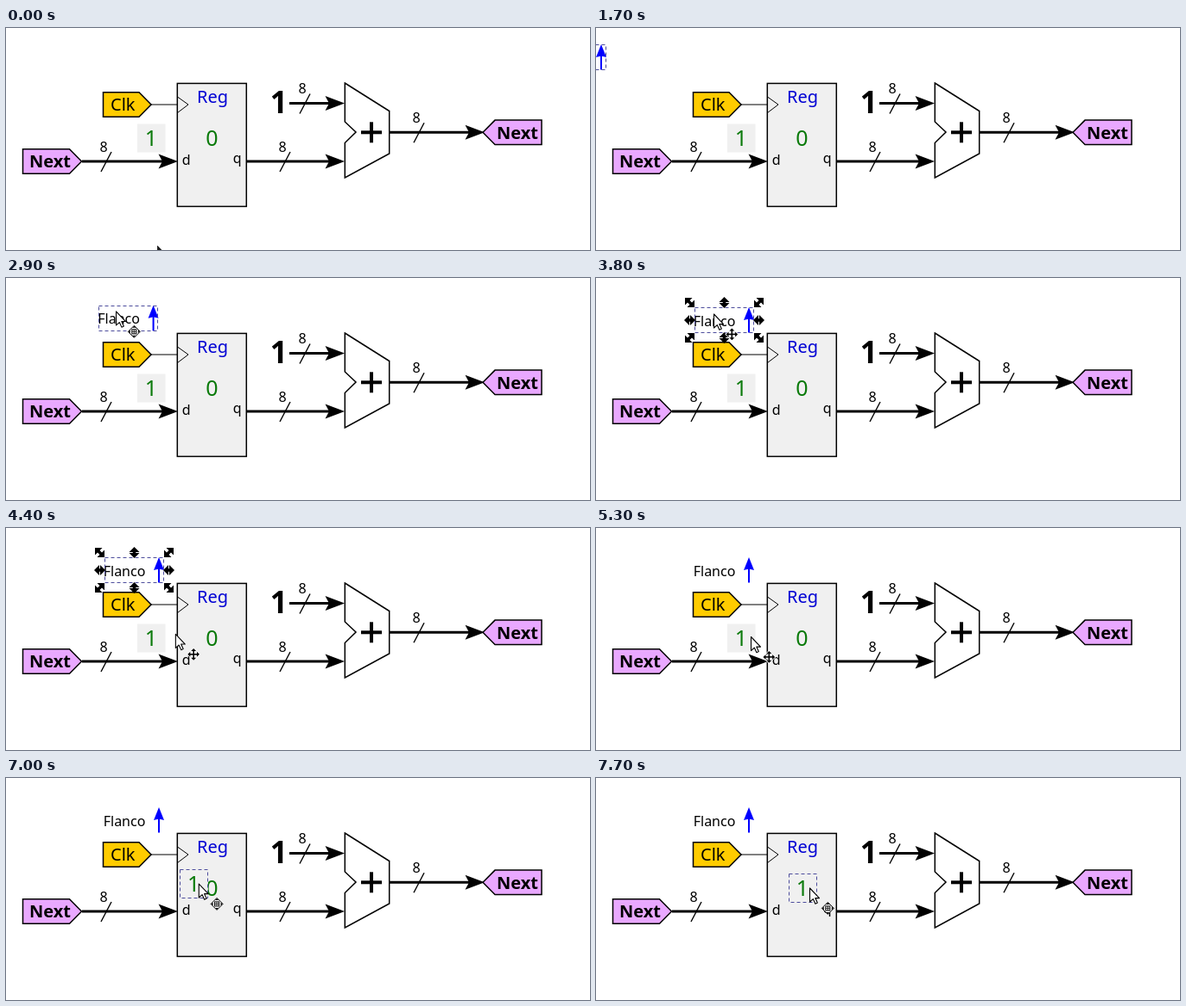
An HTML page with a canvas that plays this animation: 676 px wide and 258 px high, repeating every 8 s.

```html
<!DOCTYPE html>
<html lang="es">
<head>
<meta charset="utf-8">
<title>Registro y sumador</title>
<style>
html, body { margin: 0; width: 676px; height: 258px; overflow: hidden; background: #fff; }
canvas { display: block; }
</style>
</head>
<body>
<canvas id="stage" width="676" height="258"></canvas>
<script>
const ctx = document.getElementById('stage').getContext('2d');
const LOOP = 8000, STEP = 100;
const GREY = '#f0f0f0', PINK = '#e9a8ff', GREEN = '#0a7a0a';
const { PI, sin } = Math;

// ---- Motion ----

const ramp = (t, from, to) => Math.min(1, Math.max(0, (t - from) / (to - from)));
const easeOut = u => 1 - (1 - u) ** 2;

// Offset of the edge label from its resting place
function edgeOffset(t) {
  const enter = ramp(t, 1700, 2500), settle = easeOut(ramp(t, 2500, 3200));
  return [-171 + 136 * enter + 35 * settle, -15 + 3 * enter + 12 * settle];
}

// Offset of the value as it is dragged into the register
function valueOffset(t) {
  const u = ramp(t, 6330, 7700);
  return [71 * sin(u * PI / 2), -5 * sin(u * PI) ** 2];
}

function pointerAt(t) {
  if (t < 1600) {
    const hop = ramp(t, 100, 200), left = ramp(t, 400, 600), out = ramp(t, 700, 900);
    return [174 - hop - 125 * left - 80 * out, 251 - 9 * hop - 4 * left - 114 * out];
  }
  if (t < 3800) {
    const [dx, dy] = edgeOffset(t), slip = ramp(t, 2500, 3200);
    return [130 + dx + 6 * slip, 40 + dy + 2 * slip];
  }
  const arc = ramp(t, 3800, 4500), back = ramp(t, 5000, 5300), aim = ramp(t, 5400, 5700);
  const [dx, dy] = valueOffset(t);
  return [
    136 + 44 * arc + 51 * sin(arc * PI) - back - 8 * aim + dx + 5 * ramp(t, 6330, 7700),
    42 + 95 * arc - 10.5 * back + 1.5 * aim - 5 * sin(aim * PI) + dy
  ];
}

// ---- Drawing helpers ----

function poly(pts, fill, stroke, width = 1.5) {
  ctx.beginPath();
  pts.forEach(([x, y]) => ctx.lineTo(x, y));
  ctx.closePath();
  if (fill) { ctx.fillStyle = fill; ctx.fill(); }
  if (stroke) { ctx.strokeStyle = stroke; ctx.lineWidth = width; ctx.stroke(); }
}

function line(x0, y0, x1, y1, width, color = '#000') {
  ctx.beginPath();
  ctx.moveTo(x0, y0);
  ctx.lineTo(x1, y1);
  ctx.strokeStyle = color;
  ctx.lineWidth = width;
  ctx.stroke();
}

function plus(x, y, r, width, color) {
  line(x - r, y, x + r, y, width, color);
  line(x, y - r, x, y + r, width, color);
}

function text(str, x, y, size, color = '#000', weight = 400) {
  ctx.font = `${weight} ${size}px "Noto Sans", "Open Sans", sans-serif`;
  ctx.fillStyle = color;
  ctx.fillText(str, x, y);
}

function dashedBox(x, y, w, h) {
  ctx.setLineDash([4, 3]);
  ctx.strokeStyle = '#4c4c9c';
  ctx.lineWidth = 1;
  ctx.strokeRect(Math.floor(x) + 0.5, Math.round(y) + 0.5, w, h);
  ctx.setLineDash([]);
}

// Label shape with a point at one end
function tag(tail, tip, y, fill) {
  const shoulder = tip - Math.sign(tip - tail) * 14, h = 14.2;
  poly([[tail, y - h], [shoulder, y - h], [tip, y], [shoulder, y + h], [tail, y + h]], fill, '#000');
}

// Eight-bit wire with arrowhead and slash
function bus(x0, x1, y, slash) {
  line(x0, y, x1 - 16, y, 3);
  poly([[x1, y], [x1 - 22.5, y - 8.5], [x1 - 18, y], [x1 - 22.5, y + 8.5]], '#000');
  line(slash - 6, y + 12, slash + 6, y - 11, 1.4);
  text('8', slash - 7.4, y - 11.5, 16);
}

// ---- Scene ----

function drawCircuit() {
  bus(88, 199, 155, 116);
  tag(19.5, 87.5, 155, PINK);
  text('Next', 27, 162, 20, '#000', 600);

  line(168, 89, 198, 89, 1);
  tag(112.5, 168, 89, '#ffcc00');
  text('Clk', 121, 95.5, 20, '#000', 500);

  ctx.fillStyle = GREY;
  ctx.fillRect(198.3, 64.4, 80, 143);
  ctx.strokeStyle = '#000';
  ctx.lineWidth = 1.5;
  ctx.strokeRect(198.3, 64.4, 80, 143);
  poly([[198.5, 80], [211, 89], [198.5, 98.5]], null, '#000', 1);
  text('Reg', 221, 86.5, 20, '#0000d4');
  text('0', 231.2, 137, 25, GREEN, 500);
  text('d', 203.7, 158.5, 16, '#000', 500);
  text('q', 262.7, 156.5, 16, '#000', 500);

  bus(278, 392, 155, 323);
  bus(328, 392, 87.5, 346);
  text('1', 305.8, 98.5, 35, '#000', 600);

  poly([[392.3, 64], [443.7, 96.5], [443.7, 146], [392.3, 174], [392.3, 133.5], [405, 121], [392.3, 109]],
    '#fff', '#000');
  plus(423, 121.3, 12, 4);

  bus(444, 554, 121.3, 478);
  tag(620, 552, 121.3, PINK);
  text('Next', 568, 128.7, 20, '#000', 600);
}

function drawValue(t) {
  const [dx, dy] = valueOffset(t), x = 152 + dx, y = 111.5 + dy;
  ctx.fillStyle = GREY;
  ctx.fillRect(x, y, 32.5, 33);
  text('1', x + 8.7, y + 25.5, 25, GREEN, 500);
  if (t >= 6400) dashedBox(x, y - 0.5, 32, 33);
}

function drawEdge(t) {
  if (t < 1700) return;
  const [dx, dy] = edgeOffset(t), x = 177 + dx, y = 34 + dy;
  text('Flanco', 112.7 + dx, 55.7 + dy, 16, '#000', 500);
  line(x, y + 12, x, y + 29.5, 2, '#00f');
  poly([[x, y], [x - 6, y + 15], [x, y + 13.5], [x + 6, y + 15]], '#00f');
  if (t < 5100) dashedBox(114 + dx, y, 68, 29);
  if (t >= 3800 && t < 5100) drawHandles();
}

function doubleArrow(x, y, angle, r) {
  ctx.save();
  ctx.translate(x, y);
  ctx.rotate(angle);
  line(-r + 3, 0, r - 3, 0, 3.5);
  for (const s of [-1, 1]) poly([[s * r, 0], [s * (r - 6), -6], [s * (r - 6), 6]], '#000');
  ctx.restore();
}

function drawHandles() {
  for (const i of [-1, 0, 1]) for (const j of [-1, 0, 1]) {
    if (!i && !j) continue;
    const corner = i && j;
    const angle = corner ? i * j * PI / 4 : j * PI / 2;
    doubleArrow(148.5 + 40 * i, 49 + 20.5 * j, angle, corner ? 7.8 : 6.5);
  }
}

function drawMoveIcon(x, y, grabbing) {
  const heads = (r, w, color) => {
    for (let k = 0; k < 4; k++) {
      poly([[0, -r], [w, w - r], [-w, w - r]], color);
      ctx.rotate(PI / 2);
    }
  };
  ctx.save();
  ctx.translate(x, y);
  if (grabbing) {
    poly([[0, -7], [7, 0], [0, 7], [-7, 0]], '#fff', '#000', 1);
    heads(6.5, 2, '#000');
    ctx.strokeRect(-2.5, -2.5, 5, 5);
    plus(0, 0, 2.5, 0.8, '#000');
  } else {
    heads(8, 4.2, '#fff');
    plus(0, 0, 5, 4, '#fff');
    heads(6.8, 3, '#000');
    plus(0, 0, 5, 1.6, '#000');
  }
  ctx.restore();
}

function drawPointer(t) {
  const [x, y] = pointerAt(t), dark = t < 1600;
  const shape = [[0, 0], [0, 16], [3.8, 12.6], [6.4, 18.2], [8.8, 17.1], [6.3, 11.6], [11, 11.6]];
  ctx.save();
  ctx.translate(x + 0.5, y);
  ctx.lineJoin = 'round';
  poly(shape, dark ? '#1a1a1a' : '#fff', dark ? '#fff' : '#000', 1.1);
  ctx.restore();
  if (!dark) drawMoveIcon(x + 21.3, y + 23.4, t < 3800 || t >= 6200);
}

function draw(t) {
  ctx.fillStyle = '#fff';
  ctx.fillRect(0, 0, 676, 258);
  drawCircuit();
  drawValue(t);
  drawEdge(t);
  drawPointer(t);
}

const start = performance.now();
function tick() {
  const now = (performance.now() - start) % LOOP;
  draw(Math.floor(now / STEP) * STEP);
  requestAnimationFrame(tick);
}
tick();
</script>
</body>
</html>
```
